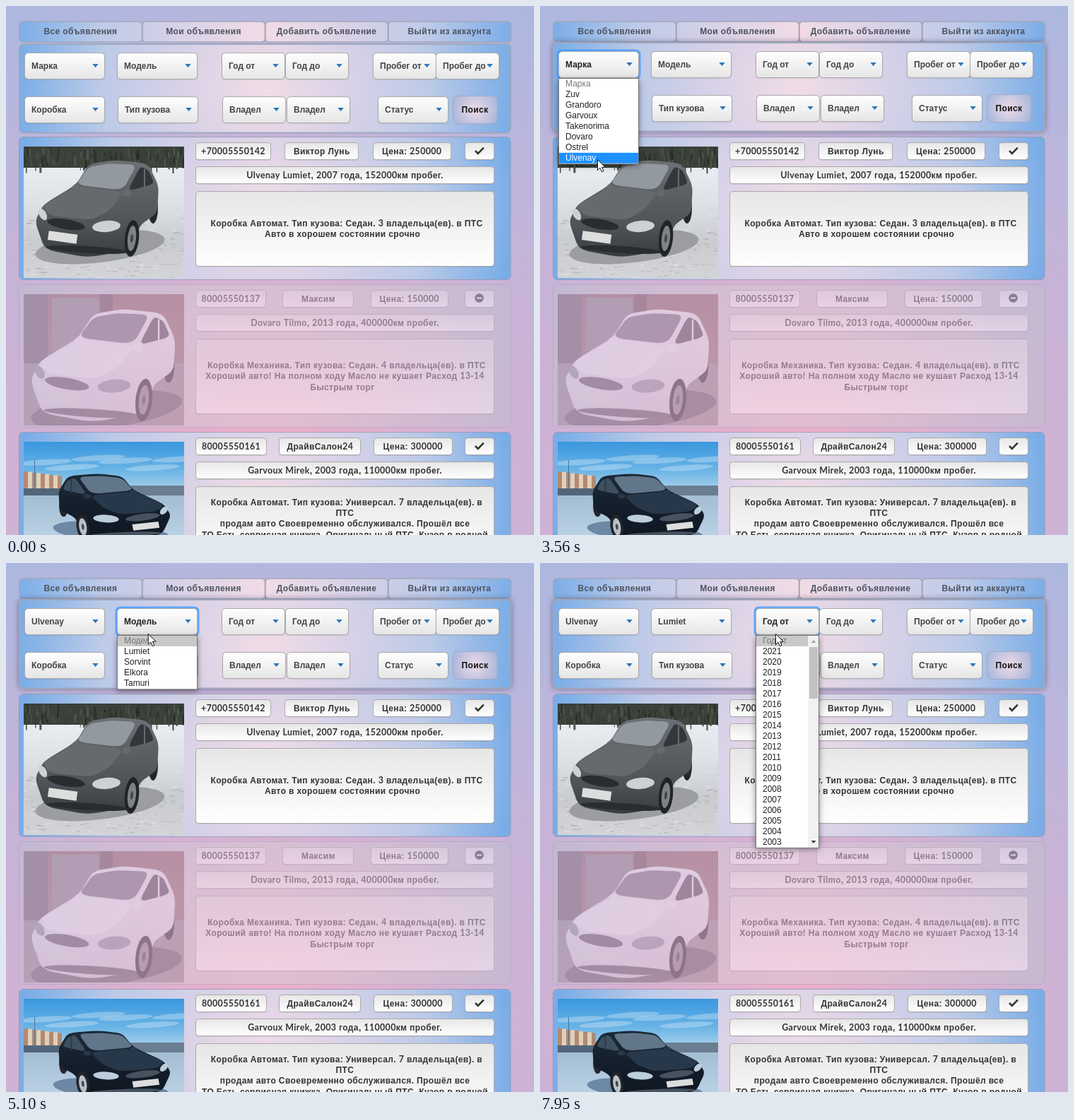
Recreate the animation shown at these times as an HTML page with a canvas. Size 747x749 px, loop 8 s.

```html
<!DOCTYPE html>
<html lang="ru">
<head>
<meta charset="utf-8">
<title>Объявления</title>
<style>
html, body { margin: 0; width: 100%; height: 100%; overflow: hidden; }
canvas { display: block; }
</style>
</head>
<body>
<canvas id="stage" width="747" height="749"></canvas>
<script>
const LOOP = 8000;
const SANS = '"Liberation Sans", Arial, sans-serif';
const BOLD = `bold 12px ${SANS}`;
const LATIN = 'bold 12.4px Lato, "Open Sans", sans-serif';
const SPACING = .38;
const BRAND = 'Ulvenay', MODEL = 'Lumiet';
const stage = document.getElementById('stage').getContext('2d');

// ---- drawing helpers ----
function box(c, x, y, w, h, r, fill, line, width = 1) {
  c.beginPath();
  c.roundRect(x, y, w, h, r);
  if (fill) { c.fillStyle = fill; c.fill(); }
  if (line) { c.strokeStyle = line; c.lineWidth = width; c.stroke(); }
}

function rect(c, fill, x, y, w, h) {
  c.fillStyle = fill;
  c.fillRect(x, y, w, h);
}

function oval(c, fill, x, y, rx, ry, turn = 0) {
  c.beginPath();
  c.ellipse(x, y, rx, ry, turn, 0, 7);
  c.fillStyle = fill;
  c.fill();
}

// Closed curve that rounds off the corners of a few key points.
function blob(c, fill, ...p) {
  const n = p.length / 2, at = i => [p[(i % n) * 2], p[(i % n) * 2 + 1]];
  c.beginPath();
  for (let i = 0; i <= n; i++) {
    const [x, y] = at(i), [nx, ny] = at(i + 1);
    c.quadraticCurveTo(x, y, x + (nx - x) * .25, y + (ny - y) * .25);
    if (i < n) c.lineTo(x + (nx - x) * .75, y + (ny - y) * .75);
  }
  c.fillStyle = fill;
  c.fill();
}

function triangle(c, x, y, w, h, color) {
  c.beginPath();
  c.moveTo(x - w / 2, y - h / 2);
  c.lineTo(x + w / 2, y - h / 2);
  c.lineTo(x, y + h / 2);
  c.fillStyle = color;
  c.fill();
}

function shades(g, colors) {
  colors.forEach((col, i) => g.addColorStop(i / (colors.length - 1), col));
  return g;
}
const vertical = (c, y0, y1, ...colors) => shades(c.createLinearGradient(0, y0, 0, y1), colors);
const radial = (c, x, y, r, ...colors) => shades(c.createRadialGradient(x, y, 0, x, y, r), colors);

const VIVID = ['#f1dce6', '#d9d2e7', '#bccae8', '#7aade7'];
const MUTED = ['#e2d6dc', '#cfcdd4', '#bfc2cd'];
const panelFill = (c, cy, colors = VIVID) => radial(c, 366, cy, 350, ...colors);

function seeded(seed) {
  return () => (seed = (seed * 16807) % 2147483647) / 2147483647;
}

function label(c, s, x, y, color, font = BOLD, align = 'left', spacing = 0) {
  c.font = font;
  c.textAlign = align;
  c.letterSpacing = spacing + 'px';
  c.fillStyle = color;
  c.fillText(s, x, Math.round(y + 4.3));
}

// Centred text: Latin letters and digits use a rounder face than Cyrillic.
function mixed(c, s, cx, y) {
  c.letterSpacing = SPACING + 'px';
  const runs = s.match(/[A-Za-z0-9+]+|[^A-Za-z0-9+]+/g).map(part => {
    const font = /[A-Za-z0-9]/.test(part) ? LATIN : BOLD;
    c.font = font;
    return { part, font, w: c.measureText(part).width };
  });
  let x = cx - runs.reduce((sum, r) => sum + r.w, 0) / 2;
  for (const r of runs) {
    label(c, r.part, x, y, '#333', r.font, 'left', SPACING);
    x += r.w;
  }
}

// ---- photos, 227 x 186 ----
function car(c, x, y, sx, sy, look) {
  c.save();
  c.translate(x, y);
  c.scale(sx, sy);
  oval(c, look.shadow, 108, 142, 92, 22, -.12);
  oval(c, '#25262b', 183, 88, 7, 21);
  blob(c, vertical(c, 20, 156, ...look.paint), 16, 106, 28, 82, 74, 54, 92, 25, 128, 19, 176, 24,
    191, 56, 189, 94, 164, 112, 156, 146, 90, 157, 30, 146);
  blob(c, look.hood, 26, 84, 75, 56, 142, 64, 122, 90, 96, 104, 38, 98);
  blob(c, look.glass, 74, 54, 92, 29, 122, 24, 160, 26, 140, 62);
  blob(c, look.side, 147, 63, 165, 28, 177, 34, 185, 53);
  rect(c, look.hood, 170, 32, 2, 28);
  oval(c, look.dark, 60, 110, 27, 7, .17);
  oval(c, look.dark, 90, 146, 58, 5, .06);
  oval(c, look.lamp, 27, 96, 5, 9, -.5);
  oval(c, look.lamp, 117, 113, 20, 8, -.08);
  for (const mx of [75, 146]) oval(c, look.hood, mx, 50 + mx / 9, 6, 5);
  c.save();
  c.rotate(.14);
  rect(c, '#dcdddd', 52, 113, 41, 13);
  c.restore();
  [[10, 26, '#222327'], [6, 18, look.rim], [2, 6, '#44464b']].forEach(([rx, ry, col]) =>
    oval(c, col, 153, 130, rx, ry, .1));
  c.restore();
}

function snowyForest(c) {
  const rnd = seeded(11);
  rect(c, vertical(c, 30, 186, '#e9ecf1', '#dde0e5', '#c9cbcf', '#d3d4d7'), 0, 0, 227, 186);
  rect(c, '#39413a', 0, 0, 227, 30);
  for (let i = 0; i < 150; i++) {
    const v = 35 + rnd() * 50;
    rect(c, `rgb(${v},${v + 5},${v - 4})`, rnd() * 227, rnd() * 24, 1 + rnd() * 2, 6 + rnd() * 10);
  }
  for (let i = 0; i < 260; i++)
    rect(c, `rgba(${rnd() < .5 ? '150,152,158' : '250,250,252'},.5)`, rnd() * 227, 95 + rnd() * 91, 2 + rnd() * 6, 1);
  car(c, 0, 0, 1, 1, { paint: ['#6d7074', '#5c5f63', '#505357', '#383b3f'], hood: '#66696d', glass: '#929a9f',
    side: '#33363b', dark: '#292c30', lamp: '#cdd1d4', rim: '#7e8287', shadow: '#9b9da2' });
}

function brickYard(c) {
  rect(c, vertical(c, 0, 186, '#8d6265', '#916d6e', '#87777b', '#857b80'), 0, 0, 227, 186);
  rect(c, '#6d6068', 0, 0, 34, 98);
  rect(c, '#8b8289', 40, 5, 66, 75);
  rect(c, '#6f4d53', 108, 0, 18, 40);
  rect(c, '#918990', 0, 98, 227, 88);
  car(c, -9, -1, 1.17, 1.16, { paint: ['#eeeef3', '#e7e8ee', '#dddfe7', '#d0d1db'], hood: '#f1f2f7', glass: '#77727d',
    side: '#4f4a55', dark: '#5d5862', lamp: '#8f94a1', rim: '#85818b', shadow: '#625d65' });
}

function winterCity(c) {
  rect(c, vertical(c, 0, 80, '#3a97de', '#69b4e6', '#c4dcea'), 0, 0, 227, 80);
  for (let i = 0; i < 6; i++)
    oval(c, 'rgba(225,238,246,.35)', 30 + i * 38, 29 + 8 * Math.sin(i * 2), 38, 4, -.06);
  for (let i = 0; i < 9; i++)
    rect(c, i % 2 ? '#e3cfb8' : '#b18a73', i * 6, 42 + i * .8, 6, 32);
  rect(c, '#6b7d91', 130, 62, 97, 18);
  rect(c, '#516679', 0, 66, 60, 11);
  rect(c, vertical(c, 76, 186, '#a3bdd2', '#b9d0e4', '#8aa8c5'), 0, 76, 227, 110);
  rect(c, '#4b7598', 15, 26, 1, 44);
  car(c, 223, 32, -.91, .68, { paint: ['#1c2a39', '#17222f', '#121c28', '#0e1620'], hood: '#27384a', glass: '#62768a',
    side: '#3e5060', dark: '#46535f', lamp: '#bccddb', rim: '#b7c1ca', shadow: '#6d88a4' });
}

// ---- listing cards ----
const cards = [
  { y: 185, photo: snowyForest, sold: false,
    chips: [['+70005550142', 107], ['Виктор Лунь', 105], ['Цена: 250000', 111]],
    title: `${BRAND} ${MODEL}, 2007 года, 152000км пробег.`,
    text: ['Коробка Автомат. Тип кузова: Седан. 3 владельца(ев). в ПТС', 'Авто в хорошем состоянии срочно'] },
  { y: 394, photo: brickYard, sold: true,
    chips: [['80005550137', 100], ['Максим', 101], ['Цена: 150000', 110]],
    title: 'Dovaro Tilmo, 2013 года, 400000км пробег.',
    text: ['Коробка Механика. Тип кузова: Седан. 4 владельца(ев). в ПТС',
      'Хороший авто! На полном ходу Масло не кушает Расход 13-14', 'Быстрым торг'] },
  { y: 603, photo: winterCity, sold: false,
    chips: [['80005550161', 101], ['ДрайвСалон24', 116], ['Цена: 300000', 112]],
    title: 'Garvoux Mirek, 2003 года, 110000км пробег.',
    text: ['Коробка Автомат. Тип кузова: Универсал. 7 владельца(ев). в', 'ПТС',
      'продам авто Своевременно обслуживался. Прошёл все',
      'ТО.Есть сервисная книжка, Оригинальный ПТС, Кузов в родной', 'краске'] }
];

function paper(c, x, y, w, h) {
  box(c, x, y + 1, w, h, 4, 'rgba(0,0,0,.07)');
  box(c, x + .5, y + .5, w - 1, h - 1, 4, vertical(c, y, y + h, '#e6e6e6', '#fff'), '#aaa');
}

function statusIcon(c, sold) {
  if (sold) {
    oval(c, '#333', 669.5, 19.5, 6.3, 6.3);
    rect(c, '#fff', 666, 18.5, 7, 2);
    return;
  }
  c.strokeStyle = '#333';
  c.lineWidth = 2.6;
  c.stroke(new Path2D('M664 20 667.8 23.8 675.8 15.6'));
}

function renderCard(card) {
  const cv = document.createElement('canvas');
  cv.width = 747;
  cv.height = 204;
  const c = cv.getContext('2d');
  const left = 268, width = 423, mid = left + width / 2, iconW = 42;
  box(c, 18.5, .5, 695.5, 202, 6, panelFill(c, 101, card.sold ? MUTED : VIVID), 'rgba(150,150,172,.8)');

  c.save();
  c.translate(25, 14);
  c.beginPath();
  c.rect(0, 0, 227, 186);
  c.clip();
  card.photo(c);
  c.restore();

  const gap = (width - iconW - card.chips.reduce((sum, [, w]) => sum + w, 0)) / 3;
  let x = left;
  for (const [s, w] of card.chips) {
    paper(c, Math.round(x), 8, w, 25);
    mixed(c, s, x + w / 2, 20.5);
    x += w + gap;
  }
  paper(c, left + width - iconW, 8, iconW, 25);
  statusIcon(c, card.sold);
  paper(c, left, 42, width, 25);
  mixed(c, card.title, mid, 55);
  paper(c, left, 77, width, 107);
  const last = card.text.length - 1;
  card.text.forEach((s, i) => {
    const shift = i === 0 ? 2.5 : i === last ? -3.5 : 0;
    mixed(c, s, mid + shift, 130 + (i - last / 2) * 15.4);
  });
  return cv;
}
cards.forEach(card => { card.image = renderCard(card); });

// ---- filter panel ----
const rows = [
  [['Марка', 26], ['Модель', 157], ['Год от', 305], ['Год до', 395], ['Пробег от', 519], ['Пробег до', 608]],
  [['Коробка', 26], ['Тип кузова', 158], ['Владел', 306], ['Владел', 397], ['Статус', 526, 100]]
];
const years = Array.from({ length: 19 }, (_, i) => String(2021 - i));
const menus = [
  { name: 'Марка', from: 1980, to: 3950, x: 26, w: 114, picked: BRAND,
    items: ['Zuv', 'Grandoro', 'Garvoux', 'Takenorima', 'Dovaro', 'Ostrel', BRAND] },
  { name: 'Модель', from: 4640, to: 5810, x: 157, w: 114, picked: MODEL,
    items: [MODEL, 'Sorvint', 'Elkora', 'Tamuri'] },
  { name: 'Год от', from: 7420, to: LOOP, x: 305, w: 90, items: years, scroll: true }
];

function drawSelect(c, x, y, w, text, focused) {
  if (focused) box(c, x - 2.5, y - 2.5, w + 5, 43, 7, 'rgba(59,153,252,.75)');
  else box(c, x - .5, y, w + 1, 39.5, 5, 'rgba(0,0,0,.06)');
  box(c, x + .5, y + .5, w - 1, 37, 5, vertical(c, y, y + 38, '#fff', '#e5e5e5'), '#aaa');
  label(c, text, x + 10, y + 18.5, focused ? '#222' : '#444');
  triangle(c, x + w - 13.5, y + 18.5, 8.5, 5, '#2b76b9');
}

function shadowBox(c, x, y, w, h, amount) {
  if (amount <= 0) return;
  c.save();
  c.shadowColor = `rgba(60,50,80,${.55 * amount})`;
  c.shadowBlur = 8;
  box(c, x, y, w, h, 6, '#9aa4bd');
  c.restore();
}

function drawNav(c) {
  const fill = panelFill(c, 36);
  ['Все объявления', 'Мои объявления', 'Добавить объявление', 'Выйти из аккаунта'].forEach((s, i) => {
    const x = 19 + i * 174;
    box(c, x, 22, 173.5, 29, 5, fill, '#a3a6b9', 1.6);
    label(c, s, x + 86.5, 36, '#4d535e', BOLD, 'center', SPACING);
  });
}

function drawFilter(c, t, up) {
  const focused = menus.filter(m => t >= m.from).pop();
  c.save();
  c.translate(0, -2 * up);
  shadowBox(c, 18, 53, 697, 127, up);
  box(c, 19, 54, 695, 125.5, 6, panelFill(c, 117), '#a0a8bd', 1.8);
  rows.forEach((row, r) => {
    for (const [name, x, w = x < 300 ? 114 : 90] of row) {
      const menu = menus.find(m => m.name === name);
      const text = menu && menu.picked && t >= menu.to ? menu.picked : name;
      drawSelect(c, x, 66 + r * 62, w, text, menu && menu === focused);
    }
  });
  box(c, 632.5, 127.5, 62.5, 39, 6, radial(c, 663.5, 147, 36, '#eddbe7', '#a5b4da'), '#a3abc4');
  label(c, 'Поиск', 663.5, 147, '#111', BOLD, 'center', SPACING);
  c.restore();
}

function drawMenu(c, m, pointerY) {
  const pitch = 14.97, top = 102.5, items = [m.name, ...m.items], h = items.length * pitch + 1.5;
  c.save();
  c.shadowColor = 'rgba(0,0,0,.45)';
  c.shadowBlur = 8;
  c.shadowOffsetY = 2;
  rect(c, '#fff', m.x, top, m.w, h);
  c.restore();
  const row = Math.max(0, Math.min(items.length - 1, Math.floor((pointerY - top) / pitch)));
  rect(c, row ? '#1e90ff' : '#c8c8c8', m.x + 1, top + .5 + row * pitch, m.w - (m.scroll ? 16 : 1), pitch);
  items.forEach((s, i) => {
    const color = i === 0 ? '#777' : i === row ? '#fff' : '#222';
    label(c, s, m.x + 10, 110 + i * pitch, color, `12px ${SANS}`);
  });
  if (m.scroll) {
    const x = m.x + m.w - 16;
    rect(c, '#f1f1f1', x, top, 15, h);
    rect(c, '#c1c1c1', x + 2, 119, 12, 73);
    triangle(c, x + 8, 111, 7, -4, '#a3a3a3');
    triangle(c, x + 8, 395, 7, 4, '#404040');
  }
  c.strokeStyle = '#777';
  c.lineWidth = 1;
  c.strokeRect(m.x + .5, top, m.w - 1, h);
}

// ---- pointer ----
// Each move: start, end, x, y; it rests in between.
const moves = [
  [250, 400, 729, 738], [1180, 1650, 74, 90], [2970, 3560, 81, 217], [3950, 4240, 126, 155],
  [4240, 4510, 199, 92], [5020, 5340, 206, 123], [6470, 6890, 331, 76], [7949, 7950, 333, 100]
];

function part(t, from, to) {
  return Math.max(0, Math.min(1, (t - from) / (to - from)));
}

function pointerAt(t) {
  return moves.reduce((p, [from, to, x, y]) => {
    const k = part(t, from, to);
    return { x: p.x + (x - p.x) * k, y: p.y + (y - p.y) * k };
  }, { x: 738, y: 743 });
}

const arrowShape = new Path2D('M.5 .5V15.5L4 12.2 6.5 17.8 9 16.7 6.6 11.3H11.3Z');
const handShape = new Path2D('M-1.5 1.2Q0-.6 1.5 1.2V7Q4 5.8 4.7 7.6 7 6.6 7.6 8.6 9.8 8 10 10.4V14Q9.5 17 8 20.5H-1L-5 14Q-6.5 11.3-4 11.2L-1.5 13.2Z');

function drawPointer(c, p, hand) {
  const shape = hand ? handShape : arrowShape;
  c.save();
  c.translate(p.x, p.y);
  c.fillStyle = '#fff';
  c.strokeStyle = '#111';
  c.lineWidth = 1;
  c.fill(shape);
  c.stroke(shape);
  if (hand) c.stroke(new Path2D('M1.5 7.5V11M4.7 7.5V11M7.6 8.5V11'));
  c.restore();
}

// ---- scene ----
function ramp(t, from) {
  const k = part(t, from, from + 110);
  return k * k * (3 - 2 * k);
}

function draw(t) {
  const c = stage, p = pointerAt(t);
  const filterUp = ramp(t, 1520) - ramp(t, 3980) + ramp(t, 4330);
  const cardUp = ramp(t, 3980) - ramp(t, 4320);
  rect(c, radial(c, 366, 660, 1030, '#eeaeca', '#94bbe9'), 0, 0, 747, 749);
  drawNav(c);
  drawFilter(c, t, filterUp);
  cards.forEach((card, i) => {
    const up = i === 0 ? cardUp : 0, y = card.y - 2 * up;
    shadowBox(c, 18, y, 697, 203, up);
    c.globalAlpha = card.sold ? .42 : 1;
    c.drawImage(card.image, 0, y);
    c.globalAlpha = 1;
  });
  const menu = menus.find(m => t >= m.from && t < m.to);
  if (menu) drawMenu(c, menu, p.y);
  if (t >= 250) drawPointer(c, p, t >= 5810 && t < 7090);
}

const start = performance.now();
function tick() {
  draw((performance.now() - start) % LOOP);
  requestAnimationFrame(tick);
}
tick();
</script>
</body>
</html>
```
